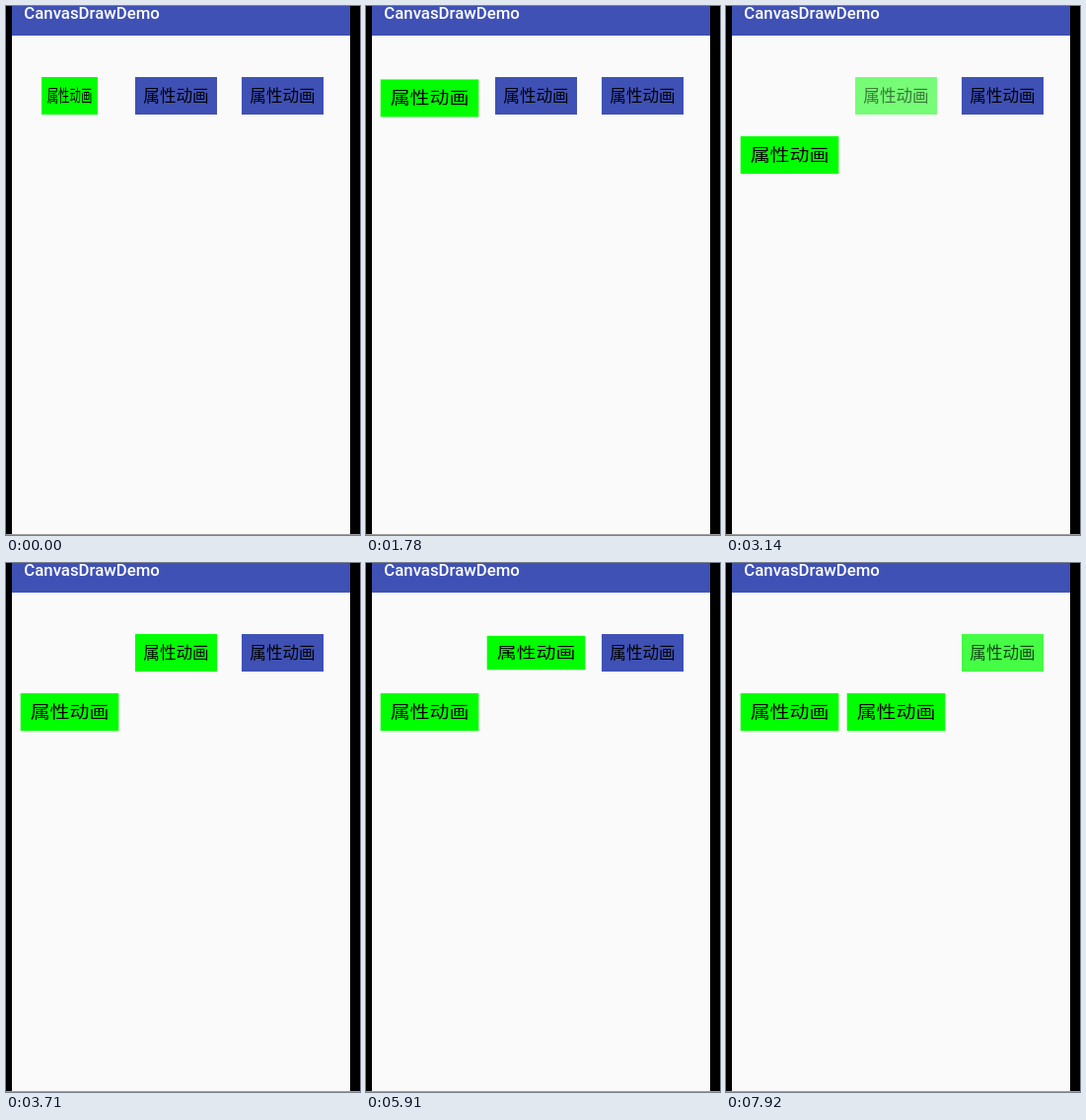
An HTML page that plays this animation: 359 px wide and 536 px high, repeating every 8000 ms.

```html
<!DOCTYPE html>
<html lang="zh-CN">
<head>
<meta charset="utf-8">
<title>CanvasDrawDemo</title>
<style>
  html, body { margin: 0; width: 100%; height: 100%; overflow: hidden; background: #000; }
  #stage { position: absolute; left: 0; top: 0; width: 359px; height: 536px; overflow: hidden; background: #000; }
  #screen { position: absolute; left: 6px; top: 0; width: 343px; height: 535px; background: #fafafa; }
  #bar { position: absolute; left: 6px; top: 0; width: 343px; height: 30px; background: #3f51b5; }
  #title { position: absolute; left: 18.3px; top: -3px; font: 500 16.8px/20px Roboto, sans-serif; color: #fff; white-space: nowrap; }
  #edge { position: absolute; left: 0; top: 535px; width: 359px; height: 1px; background: #a0a0a0; }
  .btn {
    position: absolute; top: 72px; width: 83px; height: 38px;
    font: 350 16.6px/37px "Noto Sans CJK SC", "Noto Sans CJK", sans-serif;
    text-align: center; white-space: nowrap;
  }
</style>
</head>
<body>
<div id="stage">
  <div id="screen"></div>
  <div id="bar"></div>
  <div id="title">CanvasDrawDemo</div>
  <div class="btn">属性动画</div>
  <div class="btn">属性动画</div>
  <div class="btn">属性动画</div>
  <div id="edge"></div>
</div>
<script>
const LOOP = 8000;
const FIRST = -1770, PERIOD = 4450;           // start of each button's sequence
const STAGE = 1045, SPIN = 1325, DROP = 60;
const TICK = 130;                             // refresh interval
const RESUME = [0, 1780, 3020, 5220, 6360, 7530]; // refreshes restart after a stall
const STALL = 310, LEAD = 91;                 // a stall shows the state LEAD ms before its end

const buttons = [...document.querySelectorAll('.btn')];
buttons.forEach((b, i) => { b.style.left = 23 + i * 108 + 'px'; });

// Eased progress of a stage, from 0 to 1
function ease(t, start, length) {
  const p = Math.min(1, Math.max(0, (t - start) / length));
  return 0.5 - 0.5 * Math.cos(Math.PI * p);
}

// From 1 to zero and on to end
const dip = (f, end) => f < 0.5 ? 1 - 2 * f : end * (2 * f - 1);

function pose(button, t) {
  const alpha = dip(ease(t, 0, STAGE), 1);
  const scale = dip(ease(t, STAGE, STAGE), 1.2);
  const tilt = Math.cos(2 * Math.PI * ease(t, 2 * STAGE, SPIN));
  const y = DROP * ease(t, 2 * STAGE + SPIN, STAGE);
  button.style.background = t < 0 ? '#3f51b5' : `rgba(0, 255, 0, ${alpha})`;
  button.style.color = `rgba(0, 0, 0, ${alpha})`;
  button.style.transform = `translateY(${y}px) scale(${scale}, ${tilt})`;
}

// Time of the state on show
function shown(now) {
  const next = RESUME.find(r => r > now);
  if (next - now <= STALL) return next - LEAD;
  const last = RESUME.findLast(r => r <= now);
  return now - (now - last) % TICK;
}

const begin = performance.now();

function draw() {
  const t = shown((performance.now() - begin) % LOOP);
  buttons.forEach((b, i) => pose(b, t - FIRST - i * PERIOD));
  requestAnimationFrame(draw);
}
draw();
</script>
</body>
</html>
```
